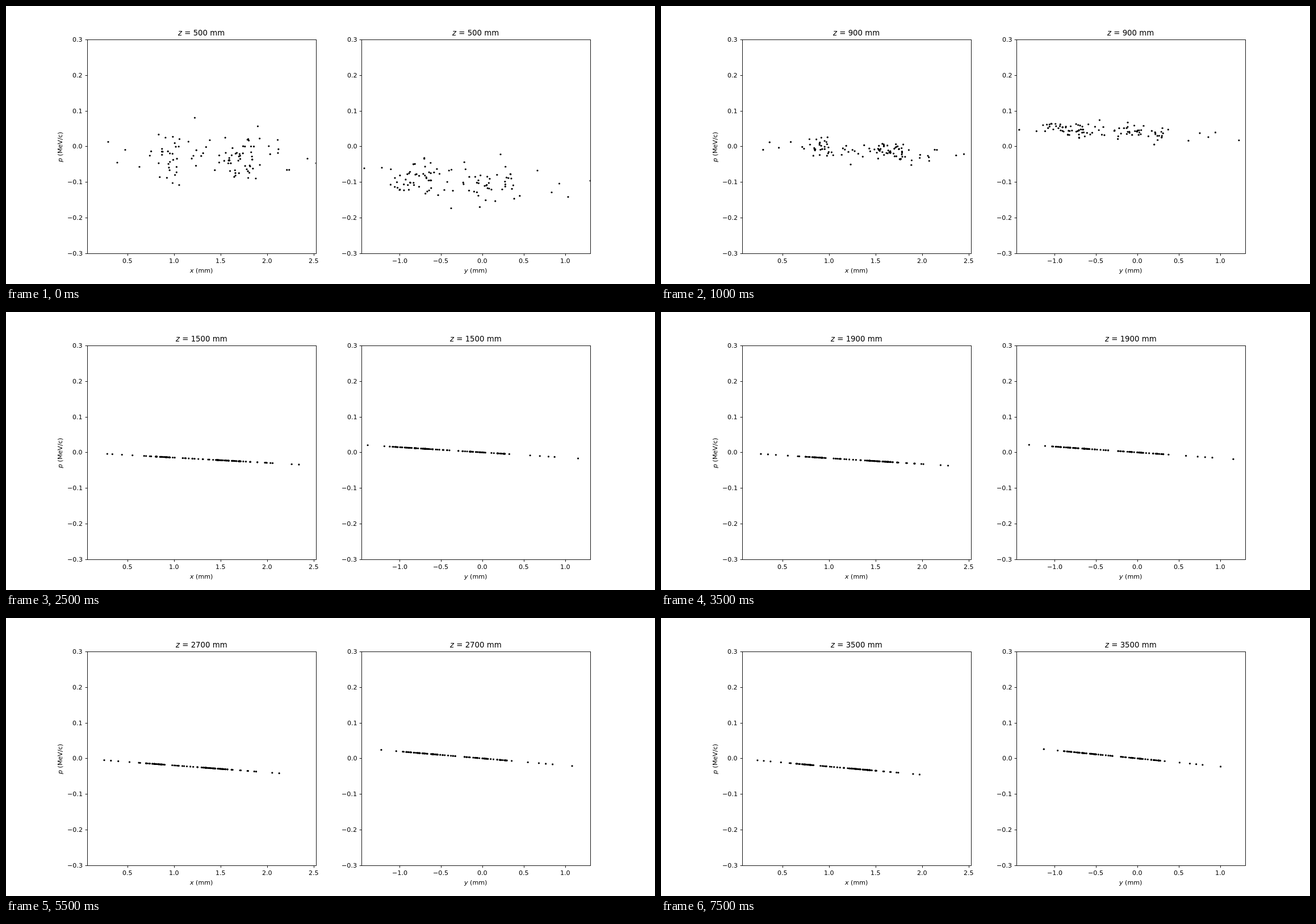
Write an HTML page with a canvas that moves like this. It is 1143 px wide and 490 px high and loops after 8 s.

```html
<!DOCTYPE html>
<html lang="en">
<head>
<meta charset="utf-8">
<title>Phase space</title>
<style>
  html, body { margin: 0; width: 100%; height: 100%; overflow: hidden; background: #fff; }
  canvas { display: block; }
</style>
</head>
<body>
<canvas id="stage" width="1143" height="490"></canvas>
<script>
const ctx = document.getElementById('stage').getContext('2d');
const TOP = 58.8, BOTTOM = 436.1, WIDTH = 402.63, ZERO_Y = (TOP + BOTTOM) / 2;
const STEP_MS = 500, STEPS = 16;
const FONT = '"DejaVu Sans", sans-serif';
const LABEL = 11.11, TITLE = 13.33;

function seeded(seed) {
  return () => {
    seed = (seed + 0x6D2B79F5) | 0;
    let t = Math.imul(seed ^ (seed >>> 15), 1 | seed);
    t = (t + Math.imul(t ^ (t >>> 7), 61 | t)) ^ t;
    return ((t ^ (t >>> 14)) >>> 0) / 4294967296;
  };
}

// Particles scattered around a centre, denser toward the middle.
function cloud(seed, count, x, spreadX, y, spreadY) {
  const rnd = seeded(seed);
  const bell = () => rnd() + rnd() - 1;
  return Array.from({ length: count }, () => [x + spreadX * bell(), y + spreadY * bell()]);
}

// Outliers set the extent of each beam; the clouds fill its core.
const panels = [
  {
    axis: 'x', left: 142.9, zeroX: 132, unit: 163.8, tilt: 1, firstTick: 0.5,
    points: [
      [180, 239.5], [196, 276], [210, 253.5], [235, 283.5], [305, 315.5],
      [332.5, 197], [443.5, 212], [531, 269], [546, 277],
      ...cloud(11, 30, 284, 52, 268, 52),
      ...cloud(23, 65, 414, 100, 267, 48)
    ]
  },
  {
    axis: 'y', left: 626.1, zeroX: 838.8, unit: 145.7, tilt: 1.124, firstTick: -1,
    points: [
      [631, 286], [662, 285], [784, 356.5], [871, 261.5], [936, 290],
      [961, 328.5], [974.5, 313], [990, 336.5], [1029, 308],
      ...cloud(5, 52, 733, 66, 303, 46),
      ...cloud(31, 43, 848, 66, 312, 48)
    ]
  }
];

// Each particle keeps an equilibrium offset and a momentum kick away from the sloped line.
for (const panel of panels) {
  panel.particles = panel.points.map(([x, y]) => {
    const kick = y - ZERO_Y - 0.04 * panel.tilt * (x - panel.zeroX);
    return { offset: x - panel.zeroX - 0.12 * kick, kick };
  });
}

// Quarter-turn oscillation per step while the whole beam shrinks toward zero.
function particleAt({ offset, kick }, panel, k) {
  const phase = k * Math.PI / 2;
  const scale = 1 - 0.013 * k - 0.0001 * k * k;
  const slope = (0.04 + 0.0032 * k) * panel.tilt;
  const swing = k ? -0.054 * Math.sin(phase) : 0.12;
  const rise = k ? 0.42 * Math.cos(phase) + 0.035 * Math.cos(phase) ** 2 : 1;
  const dx = offset * scale + kick * swing;
  return [panel.zeroX + dx, ZERO_Y + slope * dx + kick * rise];
}

const crisp = v => Math.floor(v + 0.5) + 0.5;

function line(x1, y1, x2, y2) {
  ctx.beginPath();
  ctx.moveTo(x1, y1);
  ctx.lineTo(x2, y2);
  ctx.stroke();
}

// Text on whole pixels; align is the share of its width left of x.
function text(string, x, y, align) {
  ctx.font = `${LABEL}px ${FONT}`;
  ctx.fillText(string, Math.round(x - ctx.measureText(string).width * align), Math.round(y));
}

// Centred text that opens with an italic variable.
function mathText(variable, rest, x, y, size) {
  const italic = `italic ${size}px ${FONT}`, plain = `${size}px ${FONT}`;
  ctx.font = italic;
  const lead = ctx.measureText(variable).width;
  ctx.font = plain;
  const start = Math.round(x - (lead + ctx.measureText(rest).width) / 2);
  ctx.fillText(rest, start + lead, y);
  ctx.font = italic;
  ctx.fillText(variable, start, y);
}

const label = v => v.toFixed(1).replace('-', '\u2212');

function drawAxes({ axis, left, zeroX, unit, firstTick }, k) {
  const x0 = crisp(left), x1 = crisp(left + WIDTH), y0 = crisp(TOP), y1 = crisp(BOTTOM);
  const middle = left + WIDTH / 2;
  ctx.strokeRect(x0, y0, x1 - x0, y1 - y0);
  for (let i = 0; i < 5; i++) {
    const value = firstTick + i / 2, x = zeroX + value * unit;
    if (x > left + WIDTH) break;
    line(crisp(x), y1, crisp(x), y1 + 3.9);
    text(label(value), x, 453, 0.5);
  }
  for (let i = -3; i <= 3; i++) {
    const y = ZERO_Y - i * (BOTTOM - TOP) / 6;
    line(x0 - 3.9, crisp(y), x0, crisp(y));
    text(label(i / 10), left - 7.8, y + 4, 1);
  }
  mathText(axis, ' (mm)', middle, 470, LABEL);
  mathText('z', ` = ${500 + 200 * k} mm`, middle, 52, TITLE);
}

function drawParticles(panel, k) {
  ctx.save();
  ctx.beginPath();
  ctx.rect(panel.left, TOP, WIDTH, BOTTOM - TOP);
  ctx.clip();
  for (const particle of panel.particles) {
    const [x, y] = particleAt(particle, panel, k);
    ctx.beginPath();
    ctx.arc(x, y, 1.6, 0, Math.PI * 2);
    ctx.fill();
  }
  ctx.restore();
}

function draw(k) {
  ctx.fillStyle = '#fff';
  ctx.fillRect(0, 0, 1143, 490);
  ctx.fillStyle = ctx.strokeStyle = '#000';
  ctx.lineWidth = 0.9;
  for (const panel of panels) {
    drawParticles(panel, k);
    drawAxes(panel, k);
  }
  ctx.save();
  ctx.translate(99, 248);
  ctx.rotate(-Math.PI / 2);
  mathText('p', ' (MeV/c)', 0, 0, LABEL);
  ctx.restore();
}

const start = performance.now();
function tick() {
  const elapsed = Math.max(0, performance.now() - start);
  draw(Math.floor(elapsed / STEP_MS) % STEPS);
  requestAnimationFrame(tick);
}
tick();
</script>
</body>
</html>
```
